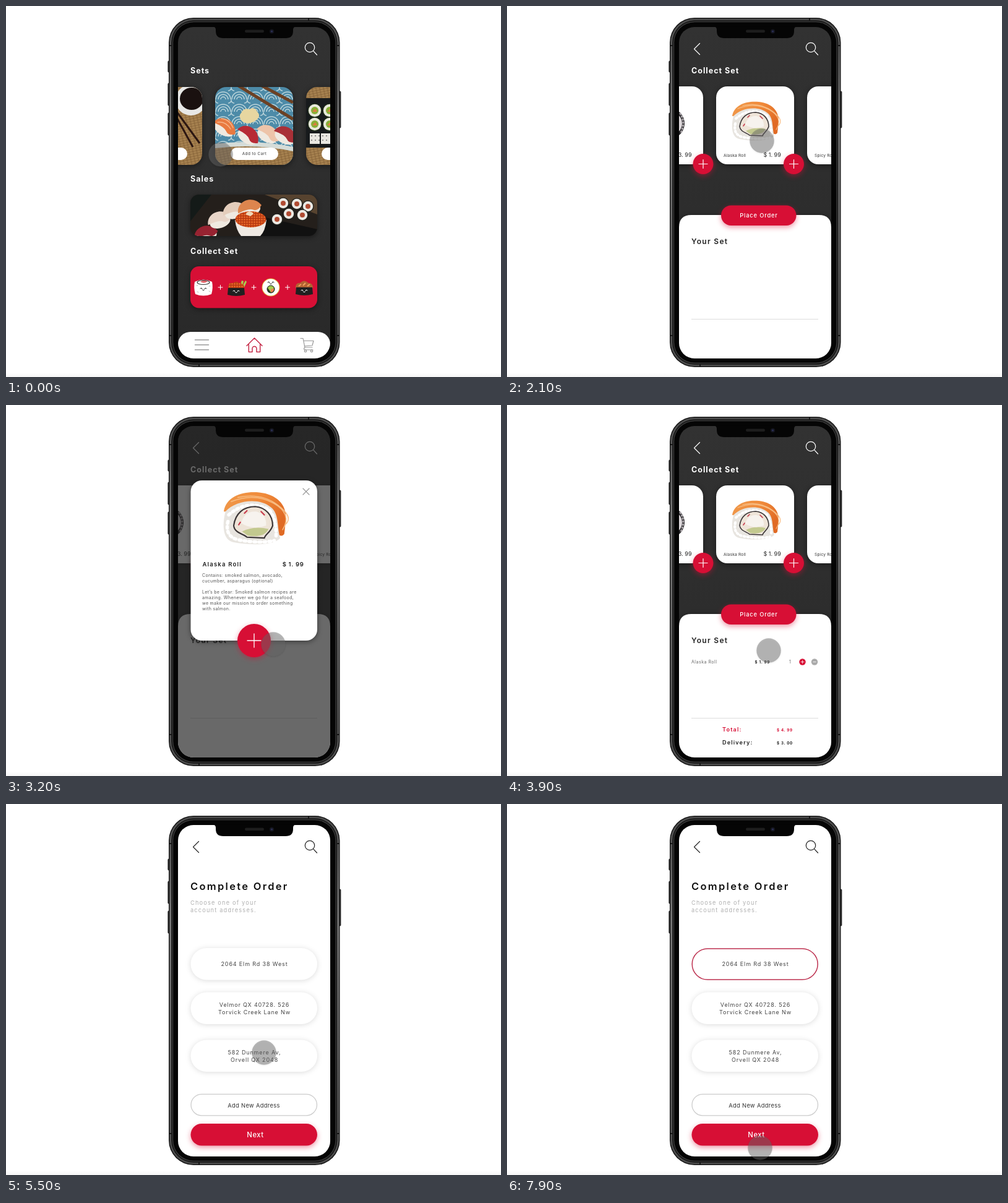
An HTML page that plays this animation: 800x600 px, repeating every 8 s.

```html
<!DOCTYPE html>
<html lang="en">
<head>
<meta charset="utf-8">
<title>Sushi order</title>
<style>
html, body { margin: 0; width: 100%; height: 100%; overflow: hidden; background: #fff; }
svg { display: block; width: 800px; height: 600px; }
text { font-family: Inter, "Open Sans", sans-serif; fill: #222; white-space: pre; }
.mid { text-anchor: middle; }
.end { text-anchor: end; }
.head { font-size: 12.5px; font-weight: 700; letter-spacing: 1px; fill: #fff; }
.panel { font-size: 12px; font-weight: 600; letter-spacing: 1.3px; }
.tiny { font-size: 6.6px; letter-spacing: .2px; fill: #333; }
.cart { font-size: 6.3px; letter-spacing: .5px; fill: #333; }
.price { font-size: 9px; }
.order { font-size: 9.3px; font-weight: 500; letter-spacing: .85px; fill: #fff; }
.name { font-size: 9.5px; font-weight: 600; letter-spacing: 1.2px; }
.body { font-size: 7px; letter-spacing: .32px; fill: #555; }
.item { font-size: 7px; letter-spacing: .5px; fill: #666; }
.cost { font-size: 6.2px; font-weight: 700; letter-spacing: .7px; }
.sum { font-size: 9.1px; font-weight: 600; letter-spacing: 1.15px; }
.big { font-size: 16.5px; font-weight: 600; letter-spacing: 2.3px; fill: #111; }
.note { font-size: 9.2px; letter-spacing: 1.2px; fill: #b0b0b0; }
.addr { font-size: 9px; letter-spacing: .85px; fill: #444; }
.add { font-size: 9.3px; letter-spacing: .35px; fill: #333; }
.next { font-size: 11.3px; font-weight: 500; letter-spacing: .5px; fill: #fff; }
.red { fill: #d70f35; }
.line { fill: none; stroke-linecap: round; stroke-linejoin: round; }
.shade { filter: drop-shadow(0 2px 4px rgba(0,0,0,.45)); }
.soft { filter: drop-shadow(0 1px 4px rgba(0,0,0,.14)); }
.glow { filter: drop-shadow(0 3px 4px rgba(215,15,53,.45)); }

.home, .collect, .modal, .added, .checkout, .chosen { opacity: 0; animation: 8s step-end infinite; }
.home { animation-name: home; }
.collect { animation-name: collect; }
.modal { animation-name: modal; }
.added { animation-name: added; }
.checkout { animation-name: checkout; }
.chosen { animation-name: chosen; }
@keyframes home { 0% { opacity: 1 } 11.875%, 100% { opacity: 0 } }
@keyframes collect { 0% { opacity: 0 } 11.875% { opacity: 1 } 61.875%, 100% { opacity: 0 } }
@keyframes modal { 0% { opacity: 0 } 30.625% { opacity: 1 } 45.625%, 100% { opacity: 0 } }
@keyframes added { 0% { opacity: 0 } 45.625%, 100% { opacity: 1 } }
@keyframes checkout { 0% { opacity: 0 } 61.875%, 100% { opacity: 1 } }
@keyframes chosen { 0% { opacity: 0 } 80.625%, 100% { opacity: 1 } }

.touch { animation: touch 8s ease-in-out infinite; filter: drop-shadow(0 1px 1px rgba(0,0,0,.2)); }
@keyframes touch {
  0%, 1.25% { transform: translate(347px, 240px) }
  10%, 15% { transform: translate(389px, 467px) }
  25.5%, 32% { transform: translate(412px, 218px) }
  40% { transform: translate(432px, 387px) }
  44% { transform: translate(422px, 390px) }
  48.75% { transform: translate(423px, 397px) }
  57.5%, 62.5% { transform: translate(408px, 344px) }
  68.75% { transform: translate(417px, 402px) }
  78.75%, 84% { transform: translate(405px, 263px) }
  97.5%, 100% { transform: translate(409px, 556px) }
}
</style>
</head>
<body>
<svg viewBox="0 0 800 600">
<defs>
  <linearGradient id="metal" x2="0" y2="1">
    <stop stop-color="#4a4a4a"/><stop offset=".3" stop-color="#777"/><stop offset="1" stop-color="#4a4a4a"/>
  </linearGradient>
  <linearGradient id="dark" x2="0" y2="1">
    <stop stop-color="#323232"/><stop offset="1" stop-color="#292929"/>
  </linearGradient>
  <linearGradient id="foot" x2="0" y2="1">
    <stop stop-color="#fff"/><stop offset="1" stop-color="#f5f5f5"/>
  </linearGradient>
  <linearGradient id="salmon" x2="1" y2=".5">
    <stop stop-color="#ef9a4c"/><stop offset=".55" stop-color="#f08a3a"/><stop offset="1" stop-color="#e06a24"/>
  </linearGradient>
  <clipPath id="screen"><rect x="278" y="34" width="246" height="536" rx="25"/></clipPath>
  <clipPath id="card"><rect width="126" height="126" rx="18"/></clipPath>
  <clipPath id="sale"><rect x="298" y="305" width="205" height="67" rx="14"/></clipPath>
  <pattern id="waves" width="26" height="20" patternUnits="userSpaceOnUse">
    <rect width="26" height="20" fill="#4d8ba8"/>
    <g fill="none" stroke="#bcd5db" stroke-width="1.5">
      <circle cx="13" cy="20" r="4"/><circle cx="13" cy="20" r="8"/><circle cx="13" cy="20" r="12"/><path d="M0 0a5 5 0 0 0 5 6M26 0a5 5 0 0 1-5 6"/>
    </g>
  </pattern>
  <pattern id="mat" width="6" height="4" patternUnits="userSpaceOnUse" patternTransform="rotate(-12)">
    <rect width="6" height="4" fill="#a98451"/><path d="M0 1h6M3 0v4" stroke="#7c5a32" stroke-width=".8"/>
  </pattern>
  <pattern id="roe" width="4" height="4" patternUnits="userSpaceOnUse">
    <rect width="4" height="4" fill="#b93a12"/><circle cx="1.5" cy="1.5" r="1.3" fill="#f0702c"/>
  </pattern>

  <!-- salmon roll, about 76 by 63 -->
  <g id="alaska">
    <path d="M-37-8C-34-27-13-33 6-31C26-29 39-17 38 1L36 19C33 24 27 20 26 14L8-6Z" fill="url(#salmon)"/>
    <path class="line" d="M-28-20Q0-31 23-18T34 14M-20-25Q8-31 28-16T37 8" stroke="#f8bd83" stroke-width="1.2"/>
    <path d="M-35-8C-22-22 6-25 20-13C30-5 27 10 31 24C24 33-6 33-26 29C-40 25-38 4-35-8Z" fill="#e8e5e0"/>
    <path class="line" d="M-31-4Q-8-24 18-10Q27 2 26 23M-32 4Q-36 22-20 26Q6 31 24 27" stroke="#fff" stroke-width="4" stroke-dasharray="2 4"/>
    <path d="M-25 9C-23-6-13-14 1-14C14-13 22-3 22 9C19 18 13 19 12 24L-9 23C-13 19-24 18-25 9Z" fill="#eee4d8" stroke="#3a3536" stroke-width="1.6"/>
    <path d="M-15 16Q0 9 17 13Q12 24-8 21Z" fill="#c3c98f"/>
    <path d="M-16 6Q-12-9 2-8Q15-5 14 9Q-2 15-16 6Z" fill="#f7f3ee"/>
    <path class="line" d="M-12-6l3-3M8-8l4 4M-17 5l-2 3" stroke="#c83a4b" stroke-width="1.6"/>
  </g>
  <g id="plus"><circle class="red" r="16.5"/><path class="line" d="M-7 0H7M0-7V7" stroke="#fff" stroke-width="1.2"/></g>
  <g id="search" class="line" stroke-width="1.2"><circle cx="491" cy="67" r="7.7"/><path d="M496.6 72.6L502.5 79"/></g>
  <path id="back" class="line" d="M311.5 60.5L302.5 69.5L311.5 78.5" stroke-width="1.2"/>
  <g id="roll"><circle r="9.5" fill="#20231f"/><circle r="8.2" fill="#ece9e3"/><circle r="4" fill="#b04b32"/></g>
  <g id="green"><circle r="11.5" fill="#1d2a17"/><circle r="10.2" fill="#e8eadb"/><circle r="6" fill="#88ae36"/><path d="M-4 2l5-5 3 5z" fill="#dd7b3f"/></g>
  <g id="nigiri"><ellipse cy="6" rx="17" ry="10" fill="#efe9e0"/><path d="M-20 5C-17-15 12-17 20 4Q11 12 5 7T-20 5Z"/></g>
  <g id="pill"><rect x="25" y="98" width="77" height="20" rx="10" fill="#fff"/></g>
  <g id="face" class="line" stroke-width="1"><path d="M-5 0l2-1 1 2M5 0l-2-1-1 2M-1 2.5h2"/></g>
  <g id="boat"><path d="M-13-1h26l1 11q-14 4-28 0z" fill="#202020"/><use href="#face" y="4" stroke="#fff"/></g>
  <path id="sign" class="line" d="M-3.5 0h7M0-3.5v7" stroke="#fff" stroke-width="1"/>
</defs>

<rect y="593" width="800" height="7" fill="url(#foot)"/>

<!-- phone body -->
<g fill="#333" stroke="#111" stroke-width=".7">
  <rect x="261.8" y="89" width="3" height="18" rx="1"/><rect x="261.8" y="125" width="3" height="36" rx="1"/>
  <rect x="261.8" y="173" width="3" height="36" rx="1"/><rect x="538" y="138" width="3" height="59" rx="1"/>
</g>
<rect x="263" y="19" width="276.5" height="565" rx="40" fill="#101010"/>
<rect x="264.3" y="20.3" width="273.9" height="562.4" rx="39" fill="url(#metal)"/>
<rect x="267.2" y="23.2" width="268.1" height="556.6" rx="36" fill="#111"/>
<rect x="268.7" y="24.7" width="265.1" height="553.6" rx="34.5" fill="#393939"/>
<rect x="270.2" y="26.2" width="262.1" height="550.6" rx="33" fill="#050505"/>
<path d="M263.5 64h4M535 64h4M263.5 533h4M535 533h4M312 580v4M489 19.5v4" stroke="#161616" stroke-width="2"/>

<g clip-path="url(#screen)">
  <rect x="278" y="34" width="246" height="536" fill="url(#dark)"/>

  <g class="home">
    <use href="#search" stroke="#fff"/>
    <text class="head" x="298" y="109">Sets</text>
    <text class="head" x="298" y="284">Sales</text>
    <text class="head" x="298" y="400.5">Collect Set</text>

    <g class="shade"><g transform="translate(191 131)" clip-path="url(#card)">
      <rect width="126" height="126" fill="url(#mat)"/>
      <circle cx="108" cy="21" r="25" fill="#e8e8e6"/><ellipse cx="109" cy="19" rx="19" ry="18" fill="#1a1110"/>
      <path d="M82 36L122 91M84 48L111 97" stroke="#2c1712" stroke-width="3"/>
      <use href="#pill"/>
    </g></g>
    <g class="shade"><g transform="translate(338 131)" clip-path="url(#card)">
      <rect width="126" height="126" fill="url(#waves)"/>
      <path d="M0 96Q62 90 126 102V126H0Z" fill="url(#mat)"/>
      <path d="M0 92Q66 84 126 97V104Q66 91 0 99Z" fill="#d5dcd8"/>
      <path d="M36-3L126 52M70-5L126 25" stroke="#6c4124" stroke-width="5"/>
      <path d="M42 42q4-9 13-6q9-5 13 4q7 7-2 14q-13 9-23 1q-6-8-1-13z" fill="#e7d6a0"/>
      <use href="#nigiri" fill="#e97a40" transform="translate(17 63) rotate(30)"/>
      <use href="#nigiri" fill="#b72a35" transform="translate(55 76) rotate(35)"/>
      <use href="#nigiri" fill="#edc4a9" transform="translate(87 74) rotate(30)"/>
      <use href="#nigiri" fill="#a93037" transform="translate(115 76) rotate(28)"/>
      <path class="line" d="M4 57q13-2 21 11M10 51q13 1 19 15" stroke="#f6b78b" stroke-width="1.3"/>
      <use href="#pill"/><text class="cart mid" x="63.5" y="110.3">Add to Cart</text>
    </g></g>
    <g class="shade"><g transform="translate(485 131)" clip-path="url(#card)">
      <rect width="126" height="126" fill="url(#mat)"/>
      <path d="M0 18H126V98H0Z" fill="#171a1c"/>
      <use href="#green" x="14" y="38"/><use href="#green" x="14" y="60"/><use href="#green" x="38" y="38"/><use href="#green" x="38" y="60"/>
      <path d="M6 75h16v17H6zM24 75h16v17H24z" fill="#e9e7e1"/>
      <path d="M8 79h30M8 86h30" stroke="#333" stroke-dasharray="2 4"/>
      <use href="#pill"/>
    </g></g>

    <g class="shade"><g clip-path="url(#sale)">
      <rect x="298" y="305" width="205" height="67" fill="#241f1b"/>
      <path d="M418 305h85v32z" fill="#57432f"/><path d="M298 305h34l-34 43z" fill="#141a18"/>
      <g transform="rotate(-18 340 350)">
        <use href="#nigiri" fill="#972331" transform="translate(318 360)"/>
        <use href="#nigiri" fill="#e8d5c8" transform="translate(346 345)"/>
        <use href="#nigiri" fill="#e4cdbb" transform="translate(374 338)"/>
        <use href="#nigiri" fill="#dd854e" transform="translate(398 342)"/>
      </g>
      <path d="M406 339l97 22v11h-97z" fill="#111"/>
      <use href="#roll" x="488" y="324"/><use href="#roll" x="470" y="320"/><use href="#roll" x="448" y="319"/>
      <use href="#roll" x="479" y="338"/><use href="#roll" x="457" y="336"/><use href="#roll" x="438" y="345"/>
      <path d="M370 346h51q-2 18-10 26h-31q-8-9-10-26z" fill="#eee9e3"/>
      <ellipse cx="395.5" cy="345" rx="25" ry="13" fill="url(#roe)"/>
      <path d="M387 337q6-9 13-1l-5 4z" fill="#f0d8b9"/>
    </g></g>

    <rect class="red shade" x="298" y="421" width="205" height="67.5" rx="14"/>
    <g transform="translate(319 456)">
      <path d="M-14-10q14-7 28 0q2 10-1 20q-13 5-26 0q-3-10-1-20z" fill="#fff"/>
      <path d="M-5-10q5-4 12-1q-5 5-12 1z" fill="#e4656b"/><ellipse cy="-9" rx="10" ry="3.5" class="line" stroke="#333" stroke-width="1.2"/>
      <path class="line" d="M-10 6l2 1M9 5l2 1M-11-4h2M9-3h2" stroke="#bbb"/><use href="#face" y="1" stroke="#222"/>
    </g>
    <g transform="translate(372 456)">
      <path d="M6-2l3-10 3 1-2 8zM10-3l5-9 2 2-4 9z" fill="#a9cf4f"/><path d="M-13 0q0-10 8-8q5-4 10 0q8 0 8 8z" fill="url(#roe)"/><use href="#boat" y="1"/>
    </g>
    <g transform="translate(428 455)">
      <circle r="14.5" fill="#e0b33e"/><circle r="13.5" fill="#fff"/><circle cy="3" r="6.5" fill="#263824"/><path d="M-5 1a5.5 5.5 0 0 1 10 0L0 8z" fill="#a6cd4e"/><path d="M0 3l5-1a5 5 0 0 1-5 6z" fill="#eb8251"/><use href="#face" y="-8" stroke="#222"/>
    </g>
    <g transform="translate(482 456)">
      <path d="M-14 0q0-9 7-8q7-7 14 0q7 0 7 8z" fill="#b36232"/><path d="M-9-3l4-3M-2-4l4-4M5-3l4-3" stroke="#f0a45e" stroke-width="2"/><use href="#boat" y="0"/>
    </g>
    <use href="#sign" x="346.5" y="455"/><use href="#sign" x="400.5" y="455"/><use href="#sign" x="455" y="455"/>

    <rect x="278" y="527" width="246" height="43" rx="20" fill="#fff"/>
    <path class="line" d="M305.5 540h22M305.5 548h22M305.5 556h22" stroke="#999" stroke-width="1.5"/>
    <path class="line" d="M389 549.5L401.5 537L414 549.5M392.3 547V559.5H398V554a3.5 3.5 0 0 1 7 0V559.5H410.7V547" stroke="#c52b49" stroke-width="1.5"/>
    <g class="line" stroke="#999" stroke-width="1.2"><path d="M476 537.5h4l3 14.5h12M481 541.5h16l-2 7.500l-13 1M483 552q-3 3 0 4h13"/><circle cx="484" cy="558" r="1.7"/><circle cx="494" cy="558" r="1.7"/></g>
  </g>

  <g class="collect">
    <use href="#back" stroke="#fff"/><use href="#search" stroke="#fff"/>
    <text class="head" x="298" y="109">Collect Set</text>
    <g fill="#fff" class="shade">
      <rect x="191" y="130" width="126" height="126" rx="18"/><rect x="338" y="130" width="126" height="126" rx="18"/><rect x="485" y="130" width="126" height="126" rx="18"/>
    </g>
    <ellipse cx="266" cy="190" rx="21" ry="23" fill="#29282b"/><ellipse cx="264" cy="190" rx="19" ry="19" fill="#ded9dc"/>
    <path d="M280 174q9 14 1 31" class="line" stroke="#aaa5a9" stroke-width="3" stroke-dasharray="1 4"/>
    <use href="#alaska" x="401" y="186"/>
    <text class="price end" x="298.500" y="244">$ 3. 99</text>
    <text class="tiny" x="350" y="243.500">Alaska Roll</text><text class="price" x="414.500" y="244">$ 1. 99</text>
    <text class="tiny" x="497" y="243.500">Spicy Roll</text>
    <use class="glow" href="#plus" x="317" y="255.500"/><use class="glow" href="#plus" x="463.500" y="255.500"/>

    <path class="shade" d="M278 570V358q0-20 20-20H504q20 0 20 20V570z" fill="#fff"/>
    <rect class="red glow" x="346" y="322.500" width="121.500" height="32.500" rx="16.200"/>
    <text class="order mid" x="407" y="342.300">Place Order</text>
    <text class="panel" x="298" y="385.300">Your Set</text>
    <path d="M298 506.500H503" stroke="#ddd"/>

    <g class="added">
      <text class="item" x="298" y="418">Alaska Roll</text><text class="cost" x="400.500" y="417.800">$ 1. 99</text><text class="item" x="456" y="418">1</text>
      <circle class="red" cx="477.500" cy="415.500" r="5.200"/><circle cx="497" cy="415.500" r="5.200" fill="#aaa"/>
      <path d="M474.700 415.500h5.600M477.500 412.700v5.600M494.500 415.500h5" stroke="#fff" stroke-width=".8"/>
      <text class="sum red" x="348" y="528">Total:</text><text class="cost red" x="436" y="527.500">$ 4. 99</text>
      <text class="sum" x="348" y="549">Delivery:</text><text class="cost" x="436" y="548.500">$ 3. 00</text>
    </g>
  </g>

  <g class="modal">
    <rect x="278" y="34" width="246" height="536" fill="#222" opacity=".68"/>
    <rect class="shade" x="298.500" y="122" width="204.500" height="259" rx="18" fill="#fff"/>
    <path class="line" d="M480 135l10 10M490 135l-10 10" stroke="#999" stroke-width="1.200"/>
    <use href="#alaska" transform="translate(401.500 183) scale(1.340)"/>
    <text class="name" x="317.500" y="260.500">Alaska Roll</text><text class="name end" x="481.500" y="260.500" style="letter-spacing:.7px">$ 1. 99</text>
    <g class="body">
      <text class="body" x="317" y="278">Contains: smoked salmon, avocado,</text>
      <text class="body" x="317" y="287">cucumber, asparagus (optional)</text>
      <text class="body" x="317" y="305">Let’s be clear: Smoked salmon recipes are</text>
      <text class="body" x="317" y="314">amazing. Whenever we go for a seafood,</text>
      <text class="body" x="317" y="323">we make our mission to order something</text>
      <text class="body" x="317" y="332">with salmon.</text>
    </g>
    <g class="glow"><circle class="red" cx="401" cy="381" r="27"/><path class="line" d="M390 381h22M401 370v22" stroke="#fff" stroke-width="1.300"/></g>
  </g>

  <g class="checkout">
    <rect x="278" y="34" width="246" height="536" fill="#fff"/>
    <use href="#back" stroke="#222"/><use href="#search" stroke="#222"/>
    <text class="big" x="298" y="139">Complete Order</text>
    <text class="note" x="298" y="163">Choose one of your</text><text class="note" x="298" y="175">account addresses.</text>
    <g fill="#fff" class="soft">
      <rect x="298.500" y="233" width="204.500" height="51.500" rx="25.700"/><rect x="298.500" y="304.500" width="204.500" height="51.500" rx="25.700"/><rect x="298.500" y="381.500" width="204.500" height="51.500" rx="25.700"/>
    </g>
    <g class="chosen">
      <rect x="290" y="224" width="222" height="72" fill="#fff"/>
      <rect x="299.200" y="234" width="203" height="50" rx="25" fill="#fff" stroke="#bd3150" stroke-width="1.500"/>
    </g>
    <text class="addr mid" x="401.500" y="262">2064 Elm Rd 38 West</text>
    <text class="addr mid" x="401.500" y="327.500">Velmor QX 40728. 526</text><text class="addr mid" x="401.500" y="339.500">Torvick Creek Lane Nw</text>
    <text class="addr mid" x="401.500" y="404.500">582 Dunmere Av,</text><text class="addr mid" x="401.500" y="416.500">Orvell QX 2048</text>
    <rect x="299" y="469.300" width="203.500" height="34.500" rx="17.200" fill="#fff" stroke="#ccc" stroke-width="1.300"/>
    <text class="add mid" x="400.500" y="490.500">Add New Address</text>
    <rect class="red glow" x="298.500" y="517" width="204.500" height="35.500" rx="17.700"/>
    <text class="next mid" x="403" y="538.500">Next</text>
  </g>
</g>

<!-- notch -->
<path d="M334 33.500q5 0 5 5v2q0 11.500 12 11.500H452q12 0 12-11.500v-2q0-5 5-5z" fill="#050505"/>
<rect x="386" y="38.500" width="31" height="4.500" rx="2.200" fill="#1d1d1d"/>
<circle cx="429.500" cy="41" r="3.600" fill="#15161f"/><circle cx="429.500" cy="41" r="1.600" fill="#2b2f55"/>

<circle class="touch" r="19.500" fill="rgba(110,110,110,.45)" stroke="rgba(90,90,90,.15)"/>
</svg>
</body>
</html>
```
